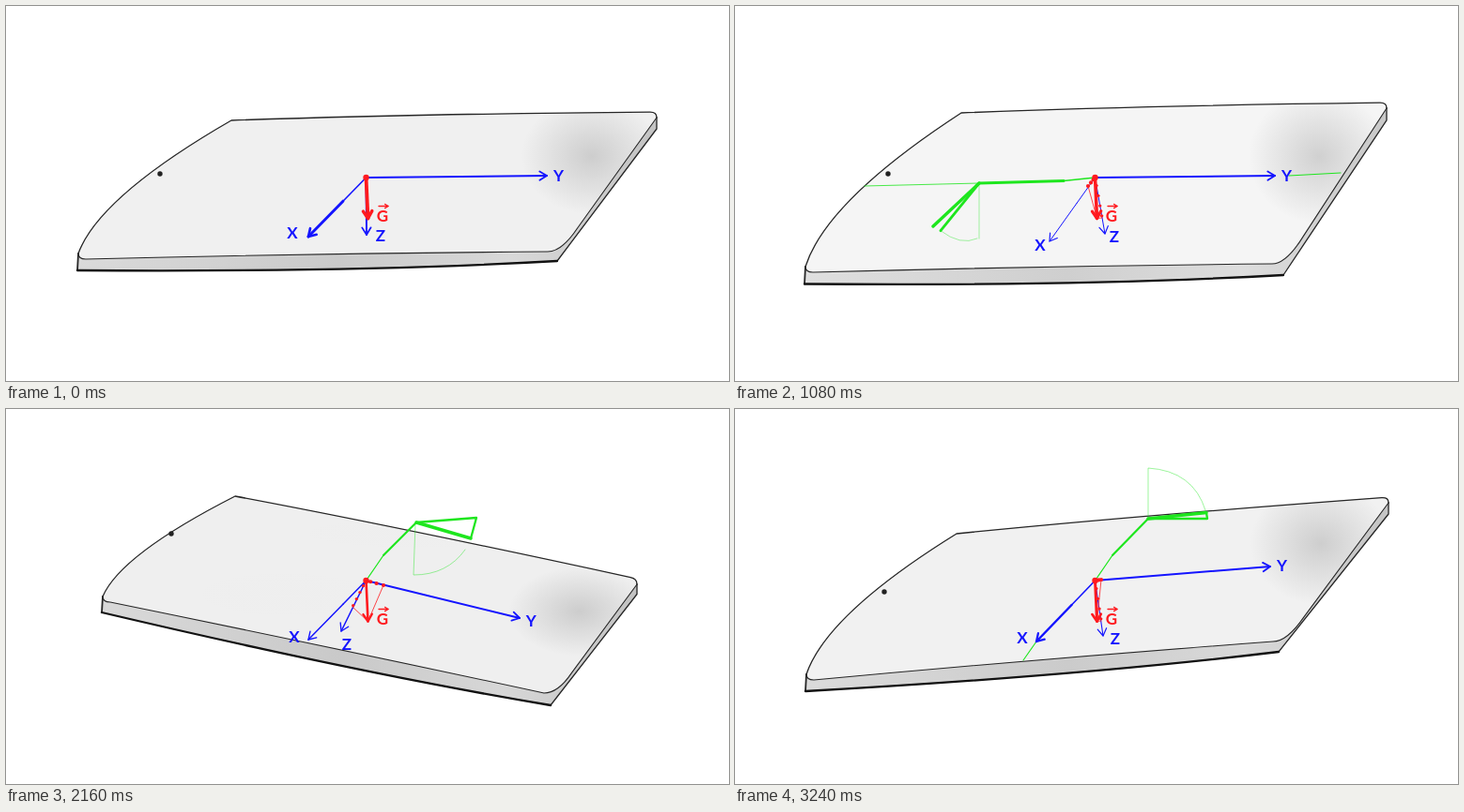
Recreate the animation shown at these times as an HTML page. Size 770 by 400 pixels, loop 3360 ms.

```html
<!DOCTYPE html>
<html lang="en">
<head>
<meta charset="utf-8">
<title>Gravity vector on a tilting device</title>
<style>
  html, body { margin: 0; width: 100%; height: 100%; overflow: hidden; background: #fff; }
  svg { display: block; width: 100vw; height: 100vh; }
  text { font: 700 17px Lato, sans-serif; text-anchor: middle; dominant-baseline: central; }
</style>
</head>
<body>
<svg id="stage" viewBox="0 0 770 400"></svg>
<script>
const BLUE = '#1414ff', RED = '#ff1a1f', GREEN = '#1ee61e', INK = '#262626';
const STEP = 120;
const LEVELS = [0, 0, 1, 2, 3, 2, 1];
const ORIGIN = [383.5, 183];

// Points: slab corners, camera, axis tips, gravity components, label centres.
const rest = {
  backLeft: [240, 122], backRight: [693, 113], lowRight: [587, 272],
  frontLeft: [78, 270], frontRight: [577, 262], camera: [164, 179],
  x: [322, 246], y: [576, 181], z: [384, 244],
  side: [384, 183], down: [385, 226], xLabel: [305, 241], zLabel: [399, 244],
  thick: [12], shade: [240], xWidth: [3], zWidth: [1.9], gWidth: [3.8]
};
const towardViewer = {
  backLeft: [238, 135], backRight: [690, 128], lowRight: [587, 249],
  frontLeft: [78, 247], frontRight: [576, 240], camera: [162, 178],
  x: [320, 214], y: [575, 182], z: [359, 237],
  side: [405, 171], down: [360, 236], xLabel: [308, 215], zLabel: [346, 235],
  thick: [9], shade: [202], xWidth: [2], zWidth: [2], gWidth: [4]
};
const awayFromViewer = {
  backLeft: [241, 114], backRight: [694, 103], lowRight: [584, 287],
  frontLeft: [76, 284], frontRight: [572, 275], camera: [163, 179],
  x: [335, 251], y: [575, 181], z: [394, 243],
  side: [376, 192], down: [391, 226], xLabel: [325, 254], zLabel: [404, 245],
  thick: [12.5], shade: [245], xWidth: [1], zWidth: [1], gWidth: [3.5]
};
const rightDown = {
  backLeft: [244, 93], backRight: [672, 181], lowRight: [580, 316],
  frontLeft: [104, 206], frontRight: [573, 303], camera: [176, 133],
  x: [322, 246], y: [547, 223], z: [357, 237],
  side: [402, 188], down: [369, 211], xLabel: [307, 242], zLabel: [363, 250],
  thick: [11], shade: [239], xWidth: [1.5], zWidth: [1.5], gWidth: [2.6]
};
const rightUp = {
  backLeft: [236, 133], backRight: [696, 94], lowRight: [579, 259],
  frontLeft: [77, 289], frontRight: [573, 248], camera: [159, 195],
  x: [321, 248], y: [570, 168], z: [392, 242],
  side: [390, 182], down: [390, 226], xLabel: [306, 243], zLabel: [405, 244],
  thick: [12], shade: [241], xWidth: [2.5], zWidth: [1.1], gWidth: [3]
};

const TILTS = [
  { pose: towardViewer, amounts: [0, 0.5, 1, 1.5], guide: pitchGuide },
  { pose: awayFromViewer, amounts: [0, 1, 2.2, 3.3], guide: pitchGuide },
  { pose: rightDown, amounts: [0, 1 / 3, 2 / 3, 1], guide: rollGuide },
  { pose: rightUp, amounts: [0, 1, 1.9, 2.7], guide: rollGuide }
];

const mix = (a, b, t) => a.map((v, i) => v + (b[i] - v) * t);
const shift = (p, dx, dy) => [p[0] + dx, p[1] + dy];
const at = p => p.map(v => +v.toFixed(1)).join(' ');
const line = (...points) => 'M' + points.map(at).join('L');
const bend = (a, c, b) => `M${at(a)}Q${at(c)} ${at(b)}`;
const stroke = (d, color, width, extra = '') =>
  `<path d="${d}" fill="none" stroke="${color}" stroke-width="${width}" stroke-linecap="round" stroke-linejoin="round" ${extra}/>`;
const fill = (d, color) => `<path d="${d}" fill="${color}"/>`;
const dot = (p, r, color) => `<circle cx="${p[0]}" cy="${p[1]}" r="${r}" fill="${color}"/>`;
const label = (p, name, color) => `<text x="${p[0]}" y="${p[1]}" fill="${color}">${name}</text>`;
const gray = v => { const g = Math.round(Math.max(150, Math.min(251, v))); return `rgb(${g},${g},${g})`; };

function arrow(from, to, color, width, size = 9) {
  const angle = Math.atan2(to[1] - from[1], to[0] - from[0]);
  const barb = turn => shift(to, -size * Math.cos(angle + turn), -size * Math.sin(angle + turn));
  return stroke(line(from, to), color, width) +
    stroke(line(barb(0.55), to, barb(-0.55)), color, Math.max(1.2, width * 0.9));
}

function blend(pose, amount) {
  const result = {};
  for (const key in rest) result[key] = mix(rest[key], pose[key], amount);
  return result;
}

function softSpot(id, center, rx, ry, tone, opacity) {
  return `<radialGradient id="${id}"><stop stop-color="${tone}" stop-opacity="${opacity}"/>
    <stop offset="1" stop-color="${tone}" stop-opacity="0"/></radialGradient>
    <ellipse cx="${center[0]}" cy="${center[1]}" rx="${rx}" ry="${ry}" fill="url(#${id})" clip-path="url(#face)"/>`;
}

function slab(p) {
  const { backLeft: bl, backRight: br, frontLeft: fl, frontRight: fr, lowRight: lr } = p;
  const thick = p.thick[0], tone = p.shade[0];
  const lowLeft = shift(fl, -2, thick), rightLow = shift(br, 0, thick * 1.5);
  const leftStart = shift(fl, -1, -6);
  const leftBend = [fl[0] + (bl[0] - fl[0]) * 0.13, fl[1] + (bl[1] - fl[1]) * 0.45];
  const backBend = shift(mix(bl, br, 0.4), 0, -3);
  const beforeCorner = mix(br, bl, 0.016), afterCorner = shift(br, 0, 6);
  const roundEnd = mix(shift(fr, 18, -5), br, 0.14);
  const lowBend = shift(mix(lowLeft, lr, 0.58), 0, 8);

  const back = `M${at(leftStart)}Q${at(leftBend)} ${at(bl)}Q${at(backBend)} ${at(beforeCorner)}Q${at(br)} ${at(afterCorner)}`;
  const rim = `L${at(roundEnd)}Q${at(shift(fr, 15, 0))} ${at(fr)}Q${at(shift(mix(fl, fr, 0.5), 0, -2))} ${at(shift(fl, 7, 0))}Q${at(shift(fl, -1, 0))} ${at(leftStart)}`;
  const lower = `L${at(rightLow)}L${at(lr)}Q${at(lowBend)} ${at(lowLeft)}Z`;
  const spot = shift(mix(br, fr, 0.45), -17, -20);
  const dark = Math.max(0, (240 - tone) / 80);
  const height = (fl[1] - bl[1]) * 0.42;

  return `<clipPath id="face"><path d="${back}${rim}Z"/></clipPath>
    <linearGradient id="edge"><stop stop-color="${gray(tone - 22)}"/>
    <stop offset=".45" stop-color="${gray(tone - 38)}"/><stop offset=".75" stop-color="${gray(tone - 24)}"/>
    <stop offset="1" stop-color="${gray(tone - 45)}"/></linearGradient>` +
    fill(back + lower, 'url(#edge)') + fill(back + rim + 'Z', gray(tone)) +
    softSpot('glare', spot, 75, height, '#999', 0.4) +
    softSpot('smudge', mix(fl, br, 0.34), 150, height * 0.8, '#777', dark * 0.4) +
    softSpot('backShade', mix(bl, br, 0.45), 180, height * 0.5, '#777', dark * 0.45) +
    stroke(back, INK, 1.3) +
    stroke('M' + at(afterCorner) + rim, INK, 1.1) +
    stroke(line(afterCorner, rightLow, lr), INK, 1.3) +
    stroke(line(leftStart, lowLeft), INK, 1.8) +
    stroke(bend(lr, lowBend, lowLeft), '#111', 2.3) +
    dot(p.camera, 2.7, '#222');
}

function pitchGuide(p, amount, up) {
  const hub = [260, 189], zero = [211, 235];
  const tip = up ? shift(zero, -8 * amount, -29 * amount) : shift(zero, 8 * amount, 4.7 * amount);
  const marks = up
    ? stroke(bend(zero, [199, 222], tip), GREEN, 0.9, 'stroke-dasharray="3 3"') +
      stroke('M207 178L217 165', GREEN, 0.9) +
      stroke('M260 188L258 140', GREEN, 0.7, 'opacity=".35"')
    : stroke(bend(tip, [240, 256], [258, 248]), GREEN, 0.8, 'opacity=".5"') +
      stroke('M260 190V248', GREEN, 0.8, 'opacity=".5"');
  return stroke(line([up ? 128 : 138, up ? 194 : 192], hub), GREEN, 0.8) +
    stroke(line(hub, [350, 186.5]), GREEN, 3) +
    stroke(line([350, 186.5], ORIGIN), GREEN, up ? 1 : 1.7) +
    stroke('M590 181L645 178', GREEN, 1) +
    stroke(line(hub, zero), GREEN, 3.4) +
    stroke(line(hub, tip), GREEN, 2.8) + marks;
}

function rollGuide(p, amount, up) {
  const hub = up ? [440, 117] : [437, 121];
  const zero = up ? [503, 117] : [501, 116];
  const tip = up ? shift(zero, -amount, -6.5 * amount) : shift(zero, -6 * amount, 22 * amount);
  const marks = up
    ? stroke('M440 117V63Q488 66 501 108', GREEN, 0.8, 'opacity=".55"') +
      stroke(line([307, 268], p.x), GREEN, 1.1)
    : stroke('M436 122L434 177Q470 177 489 150', GREEN, 0.8, 'opacity=".55"');
  return stroke(line(ORIGIN, [402, 156]), GREEN, 1.3) +
    stroke(line([402, 156], hub), GREEN, 2.2) +
    stroke(line(hub, zero, tip), GREEN, 2.3) +
    stroke(line(hub, tip), GREEN, 3.4) + marks;
}

function axes(p, tilted) {
  const tipG = [385.5, 226.5];
  const ahead = Math.hypot(p.y[0] - ORIGIN[0], p.y[1] - ORIGIN[1]);
  const yLabel = mix(ORIGIN, p.y, 1 + 12.5 / ahead);
  const middle = mix(ORIGIN, p.x, 0.4);
  let out = stroke(line(ORIGIN, middle), BLUE, Math.min(1.6, p.xWidth[0])) +
    arrow(middle, p.x, BLUE, Math.max(0.9, p.xWidth[0])) +
    arrow(ORIGIN, p.y, BLUE, 2) +
    arrow(ORIGIN, p.z, BLUE, Math.max(0.9, p.zWidth[0]));
  if (tilted) {
    out += stroke(line(p.side, tipG, p.down), RED, 0.8);
    for (const t of [0.25, 0.6, 1]) out += dot(mix(ORIGIN, p.side, t), 2.1, RED);
    for (const t of [0.2, 0.45, 0.7, 0.95]) out += dot(mix(ORIGIN, p.down, t), 1.7, RED);
  }
  return out + arrow(ORIGIN, tipG, RED, Math.max(2.4, p.gWidth[0])) + dot(ORIGIN, 3.2, RED) +
    label(p.xLabel, 'X', BLUE) + label(yLabel, 'Y', BLUE) + label(p.zLabel, 'Z', BLUE) +
    label([401, 223], 'G', RED) + arrow([397, 213.5], [407, 213.5], RED, 1.4, 4);
}

const stage = document.getElementById('stage');
let shown = -1;

function show(now) {
  const slot = Math.floor(now / STEP) % (TILTS.length * LEVELS.length);
  if (slot !== shown) {
    shown = slot;
    const turn = Math.floor(slot / LEVELS.length);
    const { pose, amounts, guide } = TILTS[turn];
    const amount = amounts[LEVELS[slot % LEVELS.length]];
    const p = blend(pose, amount);
    const up = pose === towardViewer || pose === rightUp;
    stage.innerHTML = slab(p) + (amount ? guide(p, amount, up) : '') + axes(p, amount > 0);
  }
}

const start = performance.now();
function tick() {
  show(performance.now() - start);
  requestAnimationFrame(tick);
}
tick();
</script>
</body>
</html>
```
